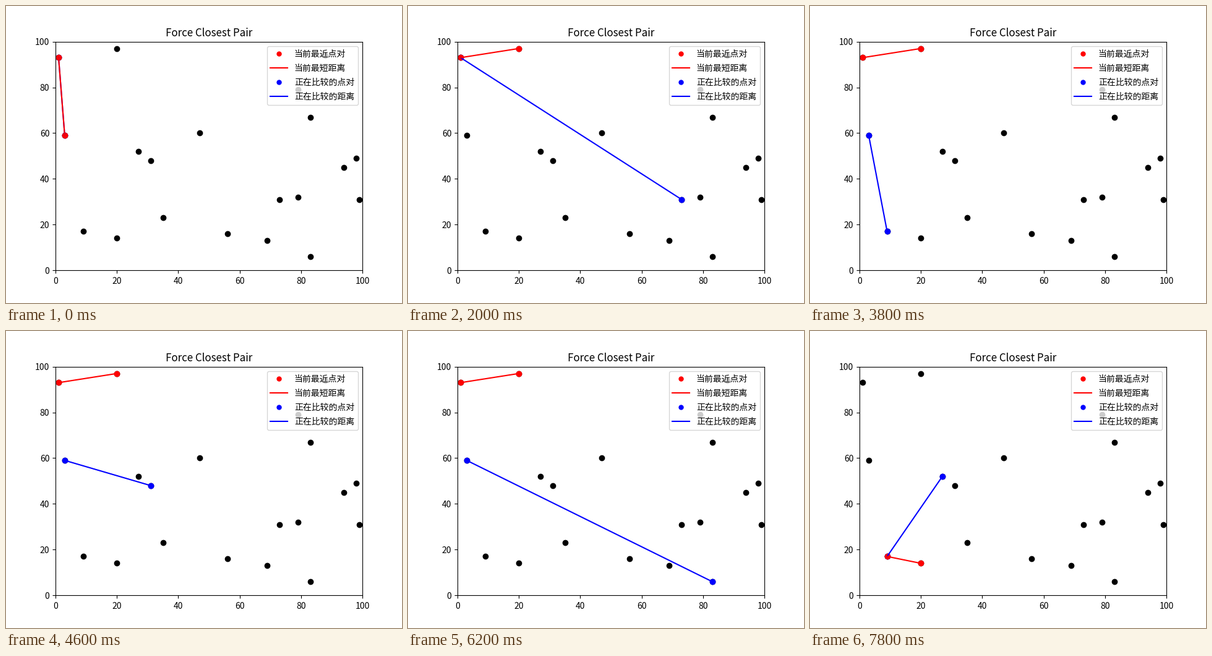
These frames come from a looping animation (640 px wide and 480 px high, 8 s). A matplotlib script:

```python
from itertools import combinations
from math import dist

import matplotlib.pyplot as plt
from matplotlib.animation import FuncAnimation
from matplotlib.patches import FancyBboxPatch

plt.rcParams["font.family"] = ["Noto Sans CJK JP"]
plt.rcParams["xtick.major.pad"] = 4.2

# The scattered points, sorted by x
POINTS = [(1, 93), (3, 59), (9, 17), (20, 14), (20, 97), (27, 52), (31, 48),
          (35, 23), (47, 60), (56, 16), (69, 13), (73, 31), (79, 32), (79, 79),
          (83, 6), (83, 67), (88, 94), (94, 45), (98, 49), (99, 31)]
STEPS = 40
PAIRS = list(combinations(POINTS, 2))[:STEPS]
EM = 100 / 7.2  # 10 pt in pixels

fig = plt.figure(figsize=(6.4, 4.8), dpi=100)
ax = fig.add_subplot()
ax.set(xlim=(0, 100), ylim=(0, 100))
ax.set_title("Force Closest Pair", fontsize=12.2)
ax.scatter(*zip(*POINTS), color="black", zorder=1)


def make_pair(color, order):
    dots = ax.scatter([], [], color=color, zorder=1 + order)
    line, = ax.plot([], [], color=color, zorder=2 + order)
    return dots, line


def place(pair_art, pair):
    dots, line = pair_art
    dots.set_offsets(pair)
    line.set_data(*zip(*pair))


def draw_legend(left=422, top=65, row=23):
    # Overlay measured in pixels, y pointing down
    panel = fig.add_axes([0, 0, 1, 1], zorder=5)
    panel.set(xlim=(0, 640), ylim=(480, 0))
    panel.axis("off")
    panel.add_patch(FancyBboxPatch(
        (left + 0.5, top + 0.5), 147, 95, fc="white", ec="0.8", alpha=0.8,
        boxstyle=f"round,pad=0,rounding_size={0.2 * EM}"))

    x, y = left + 5, top + 12.2
    for color, what in (("red", "当前最{}"), ("blue", "正在比较的{}")):
        panel.plot(x + EM, y, "o", color=color, ms=6, mew=0)
        panel.plot([x, x + 2 * EM], [y + row, y + row], color=color)
        nouns = ("近点对", "短距离") if color == "red" else ("点对", "距离")
        for noun in nouns:
            panel.text(x + 2.8 * EM, y + 5, what.format(noun), fontsize=10)
            y += row


current = make_pair("blue", 0.1)
closest = make_pair("red", 0.2)
draw_legend()


def update(step):
    place(current, PAIRS[step])
    place(closest, min(PAIRS[:step + 1], key=lambda p: dist(*p)))
    return [*current, *closest]


anim = FuncAnimation(fig, update, frames=STEPS, interval=200,
                     repeat=True, repeat_delay=0, blit=False)
plt.show()
```
